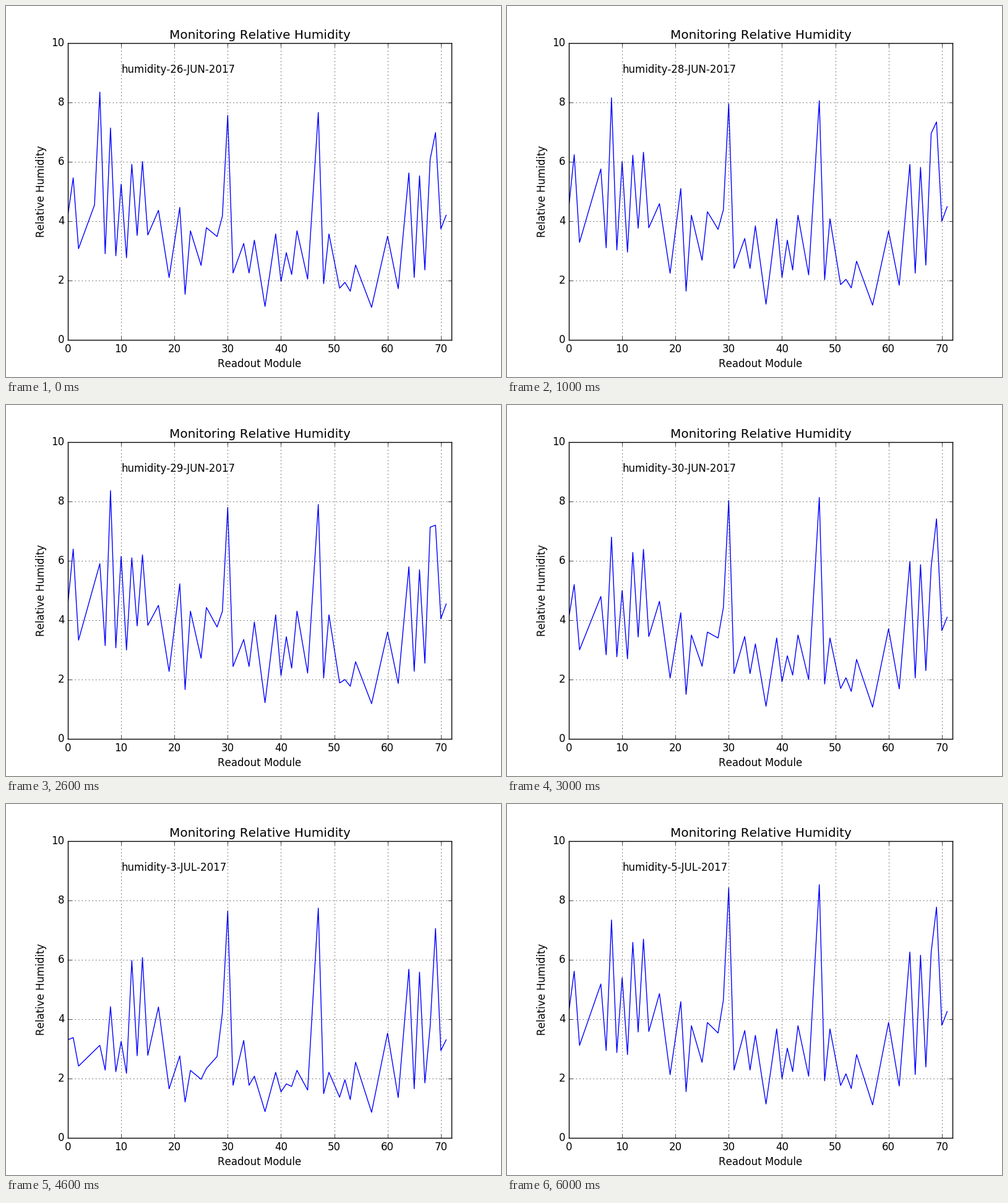
Animation, 800 px wide and 600 px high, one loop 7000 ms. Source, as a matplotlib script:

```python
import matplotlib.pyplot as plt
import numpy as np
from matplotlib.animation import FuncAnimation

plt.style.use("classic")
plt.rcParams.update({"font.family": "DejaVu Sans", "text.kerning_factor": 6,
                     "figure.dpi": 100, "savefig.dpi": 100,
                     "figure.facecolor": "white"})

MODULES = np.arange(72)
LAST = MODULES[-1]
TALL = 5

# Peak heights: some modules follow the weather, others hardly react
VARYING = {1: 5.2, 6: 4.8, 8: 6.8, 10: 5.0, 21: 4.25, 23: 3.5, 26: 3.6,
           35: 3.2, 39: 3.4, 41: 2.8, 43: 3.5, 49: 3.4, 68: 5.8}
STEADY = {12: 6.1, 14: 6.2, 17: 4.5, 29: 4.3, 30: 7.8, 33: 3.35, 47: 7.9,
          52: 2.0, 54: 2.6, 60: 3.6, 64: 5.8, 66: 5.7, 69: 7.2}

# Key points of the level between the peaks
FLOOR = {0: 4.1, 2: 3.0, 11: 2.7, 14: 3.8, 19: 2.05, 22: 1.5, 28: 3.4,
         31: 2.2, 34: 2.2, 37: 1.1, 41: 2.2, 53: 1.6, 57: 1.07, 67: 2.3,
         71: 4.1}

# Date, humidity of the day, scale of the steady modules
DAYS = [("26-JUN", 1.05, 0.97), ("28-JUN", 1.2, 1.02), ("29-JUN", 1.23, 1.0),
        ("30-JUN", 1.0, 1.03), ("3-JUL", 0.65, 0.98), ("4-JUL", 0.82, 0.94),
        ("5-JUL", 1.08, 1.08)]


def through(points):
    """Straight lines through the given points."""
    xs = sorted(points)
    return np.interp(MODULES, xs, [points[x] for x in xs])


def fall_length(height, gap):
    """Tall peaks drop within one module, low ones fade more slowly."""
    return 1 if height > TALL else min(max(2, gap // 2), gap - 1)


def readings(humidity, scale):
    floor = through(FLOOR) * np.sqrt(humidity)
    typical = VARYING | STEADY
    points = {0: floor[0], LAST: floor[LAST]}
    modules = sorted(typical)
    for m, following in zip(modules, modules[1:] + [LAST]):
        points[m] = typical[m] * (humidity if m in VARYING else scale)
        gap = following - m
        if gap > 1:
            valley = m + fall_length(typical[m], gap)
            points[valley] = floor[valley]
    return through(points)


curves = [readings(humidity, scale) for _, humidity, scale in DAYS]
curves[0][6] = 8.35  # a single spike on the first day

fig, ax = plt.subplots(figsize=(8, 6), dpi=100)
ax.set(xlim=(0, 72), ylim=(0, 10), xlabel="Readout Module",
       ylabel="Relative Humidity", title="Monitoring Relative Humidity")
ax.grid(True)
line, = ax.plot(MODULES, curves[0], "b-")
label = ax.text(10, 9, "")


def update(i):
    line.set_ydata(curves[i])
    label.set_text(f"humidity-{DAYS[i][0]}-2017")
    return line, label


anim = FuncAnimation(fig, update, frames=len(DAYS), interval=1000,
                     repeat=True, repeat_delay=0)
plt.show()
```
